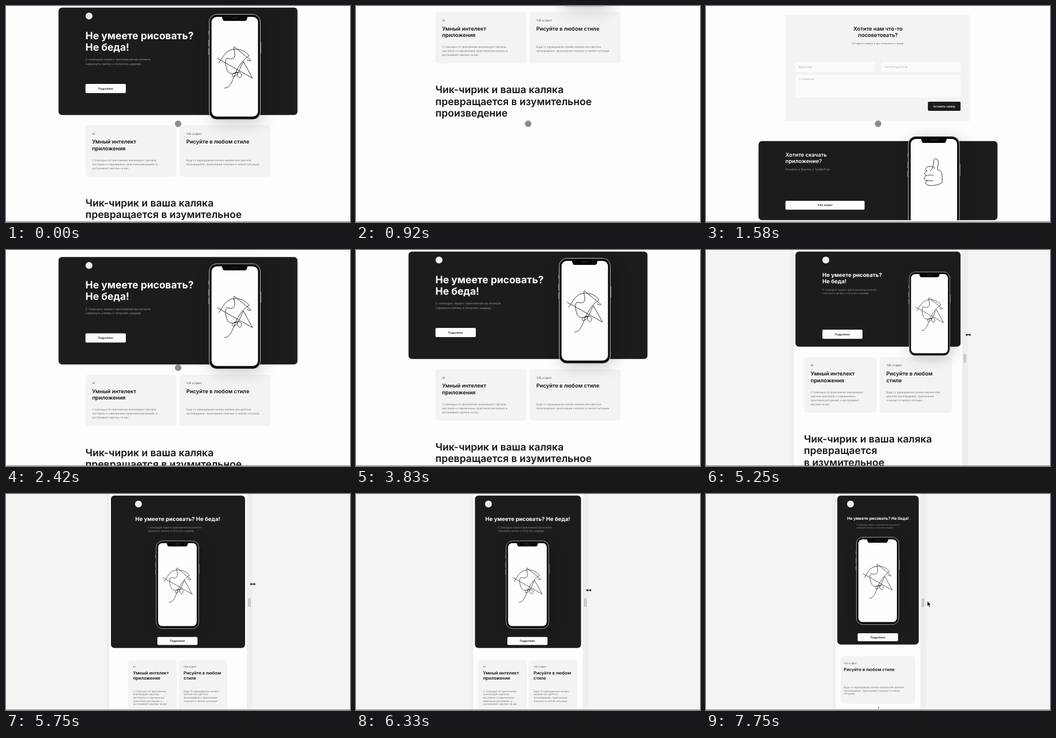
Recreate the animation shown at these times as an HTML page. Size 600 by 377 pixels, loop 8 s.

```html
<!DOCTYPE html>
<html lang="ru">
<head>
<meta charset="utf-8">
<style>
  html, body { margin: 0; width: 100%; height: 100%; overflow: hidden; background: #f4f4f4; }
  svg { display: block; width: 100%; height: 100%; font-family: Inter, sans-serif; text-rendering: geometricPrecision; }
</style>
</head>
<body>
<svg id="stage" viewBox="0 0 600 377">
  <defs>
    <filter id="blur" x="-100%" y="-60%" width="300%" height="220%"><feGaussianBlur stdDeviation="14"/></filter>
    <filter id="edge" x="-10%" y="-10%" width="120%" height="120%"><feGaussianBlur stdDeviation="5"/></filter>
    <clipPath id="footerClip"><rect x="300" y="150" width="250" height="224"/></clipPath>
    <g id="phone">
      <rect x="2" y="5" width="94" height="185" rx="20" opacity=".2" filter="url(#blur)"/>
      <path d="M-.8 30v6M-.8 45v11M-.8 60v11M90.8 49v20" stroke="#777" stroke-width="1.2"/>
      <rect x=".5" y=".5" width="89" height="183.5" rx="13" fill="#080808" stroke="#c4c4c4"/>
      <rect x="4.5" y="5" width="81" height="174" rx="9" fill="#fefefe"/>
      <path d="M22 4.5h46c-1.5 0-1 7.5-5 7.5h-36c-4 0-3.5-7.5-5-7.5z" fill="#080808"/>
      <path d="M40 7h10" stroke="#333" stroke-linecap="round"/>
    </g>
    <path id="scribble" fill="none" stroke="#222" stroke-width=".9" stroke-linejoin="round" d="M27 129c8 1 12-8 16-18 6-16 14-30 27-38C62 62 50 60 40 62 28 65 24 76 17 86M31 77C38 79 44 79 45 73 46 67 42 62 44 57L72 80C76 83 70 82 66 80M14 77 76 112 60 83C55 91 53 103 46 108 40 112 38 106 44 103 52 99 58 103 57 108 54 115 48 109 50 102 40 106 33 104 31 96 29 90 27 82 31 77"/>
  </defs>
  <rect id="pageShadow" y="-20" height="420" fill="#000" opacity=".07" filter="url(#edge)"/>
  <rect id="strip" y="0" width="10" height="377" fill="#eeeef2"/>
  <rect id="paper" height="377" fill="#fdfdfd"/>
  <g id="page">
    <rect id="hero" y="2.8" rx="6" fill="#1c1c1c"/>
    <g id="layouts"></g>
  </g>
  <g id="handle" stroke="#8a8a8a" stroke-width=".9"><path d="M-1.3 182v15M1.3 182v15"/></g>
  <circle id="touch" cx="300.2" cy="205.5" r="5.3" fill="#8c8c8c" stroke="#777" stroke-width=".6"/>
  <path id="resize" d="M-5 0l3-3v2h4v-2l3 3-3 3v-2h-4v2z" fill="#111" stroke="#fff" stroke-width=".5"/>
  <path id="arrow" d="M386 187v9l2-2 1.5 3.5 1.5-.7-1.5-3.3h3z" fill="#111" stroke="#fff" stroke-width=".5"/>
  <path d="M0 376.500h600" stroke="#8c8c8c"/>
</svg>
<script>
const $ = id => document.getElementById(id);
const DARK = '#1c1c1c', CARD = '#f3f3f3', MUTED = '#737373';

// y is the middle of the capitals of the first line; '|' separates lines
const text = (lines, x, y, size, lead = 0, fill = MUTED, weight = 400, anchor = 'start') =>
  lines.split('|').map((line, i) =>
    `<text x="${x}" y="${y + i * lead + size * .364}" font-size="${size}" fill="${fill}" font-weight="${weight}" text-anchor="${anchor}">${line}</text>`).join('');
const box = (x, y, w, h, rx, fill) => `<rect x="${x}" y="${y}" width="${w}" height="${h}" rx="${rx}" fill="${fill}"/>`;
const button = (label, x, y, w, h, fill = '#fcfcfc', ink = '#111') =>
  box(x, y, w, h, 2, fill) + text(label, x + w / 2, y + h / 2, 4.65, 0, ink, 600, 'middle');
const logo = (x, y) => `<circle cx="${x}" cy="${y}" r="6" fill="#f0f0f0"/>`;
const phone = (x, y, scale) => `<g transform="translate(${x} ${y}) scale(${scale})"><use href="#phone"/><use href="#scribble"/></g>`;
const heroTitle = (lines, x, y, size, lead, anchor) => text(lines, x, y, size, lead, '#fff', 700, anchor);
const intro = (x, y, size, lead) =>
  text('С помощью нашего приложения вы можете|чиркануть каляку и получить шедевр.', x, y, size, lead, '#929292');
const heading = (lines, x, y) => text(lines, x, y, 17.6, 20.2, '#151515', 600);

// dy holds the heights of label, title and body, sizes their font sizes, leads the line steps
function card(x, y, w, h, pad, copy, dy, sizes, leads) {
  const [label, title, body] = copy;
  return box(x, y, w, h, 5, CARD) +
    text(label, x + pad, y + dy[0], sizes[0], 0, '#555') +
    text(title, x + pad, y + dy[1], sizes[1], leads[0], '#111', 600) +
    text(body, x + pad, y + dy[2], sizes[2], leads[1]);
}
const smart = body => ['AI', 'Умный интелект|приложения', body];
const style = (title, body) => ['Ч/Б и Цвет', title, body];

const big = [[5.2, 9.35, 4.64], [11.2, 7]], small = [4.35, 7.55, 4.32];

const footer = `<g transform="translate(0 560)">` +
  box(138.7, 16, 322.5, 184.5, 2, CARD) +
  text('Хотите нам что-то|посоветовать?', 300, 39.3, 9.35, 11.2, '#111', 600, 'middle') +
  text('Оставьте заявку и мы свяжемся с вами.', 300, 65.2, 4.64, 0, MUTED, 400, 'middle') +
  box(156, 98, 138, 17, 2, '#fbfbfb') + text('Ваше Имя', 162, 106.5, 4.64, 0, '#aaa') +
  box(306, 98, 138, 17, 2, '#fbfbfb') + text('Контактный Email', 311.5, 106.5, 4.64, 0, '#aaa') +
  box(156, 120, 288, 39, 2, '#fbfbfb') + text('Сообщение', 162, 127.5, 4.64, 0, '#aaa') +
  button('Оставить заявку', 387, 167, 57, 16, DARK, '#fff') +
  box(91.6, 235.8, 416.8, 138, 6, DARK) +
  text('Хотите скачать|приложение?', 138.6, 259.2, 9.35, 11.2, '#fff', 600) +
  text('Качайте в Вантор и ТумбоРэй.', 138.6, 285.5, 5.25, 0, '#929292') +
  button('Уже скоро!', 138.6, 340, 138, 15.5) +
  `<g clip-path="url(#footerClip)"><use href="#phone" x="352.5" y="227"/></g>
   <path fill="none" stroke="#222" stroke-width=".9" d="M391 288c5-4 6-12 6-17 0-6 7-6 8 0 1 6-2 10-1 15 6 1 7 4 8 10v12c-7 5-16 6-24 5-6-1-6-7-2-8-7 0-7-8-1-9-5-1-5-8 1-8-5-2-3-9 5-8 5 0 8 1 8 4M386 296c5-2 10-1 11 1M385 305h11"/></g>`;

const layouts = [
  { minHalf: 173, heroHeight: 187.5, markup:
    logo(144.8, 17.5) + heroTitle('Не умеете рисовать?|Не беда!', 138.6, 51.2, 17.5, 20.2) + intro(138.6, 93.5, 5.27, 7.3) +
    button('Подробнее', 138.6, 136, 70.4, 16) +
    card(138.7, 208, 158.5, 90, 11.5, smart('С помощью AI приложение анализирует картины|мастеров и современных практиков рисования, и|достраивает картину за вас.'), [15, 29, 61], ...big) +
    card(303, 208, 158.5, 90, 11.5, style('Рисуйте в любом стиле', 'Будь то карандашная каляка-маляка или цветное|произведение, приложение поможет в любой ситуации.'), [15, 29, 61], ...big) +
    phone(354, 14, 1) +
    heading('Чик-чирик и ваша каляка|превращается в изумительное|произведение', 138.6, 343.6) + footer },
  { minHalf: 138, heroHeight: 166, markup:
    logo(209, 17.5) + heroTitle('Не умеете рисовать?|Не беда!', 203, 43.7, 9.65, 11) + intro(203, 69, 4.38, 6.2) +
    button('Подробнее', 203, 139, 70, 16) +
    card(171, 187, 126.5, 97, 11.5, smart('С помощью AI приложение анализирует|картины мастеров и современных|практиков рисования, и достраивает|картину за вас.'), [14.5, 29, 61], ...big) +
    card(303, 187, 126, 97, 11.5, style('Рисуйте в любом|стиле', 'Будь то карандашная каляка-маляка или|цветное произведение, приложение|поможет в любой ситуации.'), [14.5, 29, 61], ...big) +
    phone(354, 38, .795) +
    heading('Чик-чирик и ваша каляка|превращается|в изумительное', 170.8, 329.8) },
  { minHalf: 92, heroHeight: 266, markup:
    logo(231, 17.5) + heroTitle('Не умеете рисовать? Не беда!', 299.5, 43.7, 9.65, 0, 'middle') + intro(247, 58.3, 4.38, 6.2) +
    phone(261.5, 81.5, .833) + button('Подробнее', 264, 249.5, 70, 14) +
    card(213, 290, 85, 95, 8.8, smart('С помощью AI приложение|анализирует картины|мастеров и современных|практиков рисования, и|достраивает картину за вас.'), [11.5, 22.3, 54], small, [9.4, 5.7]) +
    card(301, 290, 85, 95, 8.8, style('Рисуйте в любом|стиле', 'Будь то карандашная каляка-|маляка или цветное|произведение, приложение|поможет в любой ситуации.'), [11.5, 22.3, 54], small, [9.4, 5.7]) },
  { minHalf: 0, heroHeight: 260, markup:
    logo(252, 17.5) + heroTitle('Не умеете рисовать? Не беда!', 300, 42.3, 7, 0, 'middle') + intro(262, 53.3, 3.5, 5) +
    phone(262, 75, .83) + button('Подробнее', 264.5, 243, 70.5, 14) +
    card(235, 283, 130, 83, 5.3, style('Рисуйте в любом стиле', 'Будь то карандашная каляка-маляка или цветное|произведение, приложение поможет в любой|ситуации.'), [12, 23, 54.3], small, [9.4, 5.8]) +
    '<circle cx="301" cy="373" r=".9" fill="#222"/>' }
];
$('layouts').innerHTML = layouts.map(l => `<g>${l.markup}</g>`).join('');
const groups = [...$('layouts').children];

const linear = p => p, smooth = p => p * p * (3 - 2 * p);
function track(keys, t, ease = linear) {
  const next = keys.findIndex(k => k[0] > t);
  if (next < 0) return keys[keys.length - 1][1];
  if (next === 0) return keys[0][1];
  const [t0, v0] = keys[next - 1], [t1, v1] = keys[next];
  return v0 + (v1 - v0) * ease((t - t0) / (t1 - t0));
}
const scrollKeys = [[583, 0], [1417, -560], [1583, -560], [2333, 0], [2417, 9.5], [2833, 0]];
const halfKeys = [[4000, 276], [4750, 180], [5250, 147], [5583, 127], [6333, 95.5], [6417, 94.5], [7250, 78], [7583, 74]];
const cursorKeys = [[4000, 112], [5250, 148], [6333, 168], [7583, 191]];

const set = (id, attrs) => { for (const name in attrs) $(id).setAttribute(name, attrs[name]); };
const show = (id, on) => set(id, { display: on ? 'inline' : 'none' });

function draw(now) {
  // motion advances twelve times a second
  const t = Math.floor((now % 8000 + 4) * 12 / 1000) * 1000 / 12 + .5;
  const resizing = t >= 4000;
  const half = resizing ? track(halfKeys, t) : 300;
  const heroHalf = Math.min(208.4, half - 3);
  const current = layouts.findIndex(l => half >= l.minHalf);
  groups.forEach((g, i) => g.setAttribute('display', i === current ? 'inline' : 'none'));
  set('paper', { x: 300 - half, width: half * 2 });
  set('pageShadow', { x: 300 - half, width: half * 2 });
  set('strip', { x: 300 + half });
  set('hero', { x: 300 - heroHalf, width: heroHalf * 2, height: layouts[current].heroHeight });
  set('page', { transform: `translate(0 ${track(scrollKeys, t, smooth)})` });
  set('handle', { transform: `translate(${304.5 + half} 0)` });
  set('resize', { transform: `translate(${310.5 + half} ${track(cursorKeys, t)})` });
  show('handle', resizing);
  show('resize', resizing && t < 7750);
  show('arrow', t >= 7750);
  show('touch', t < 2830);
}

const start = performance.now();
function loop() {
  draw(performance.now() - start);
  requestAnimationFrame(loop);
}
loop();
</script>
</body>
</html>
```
